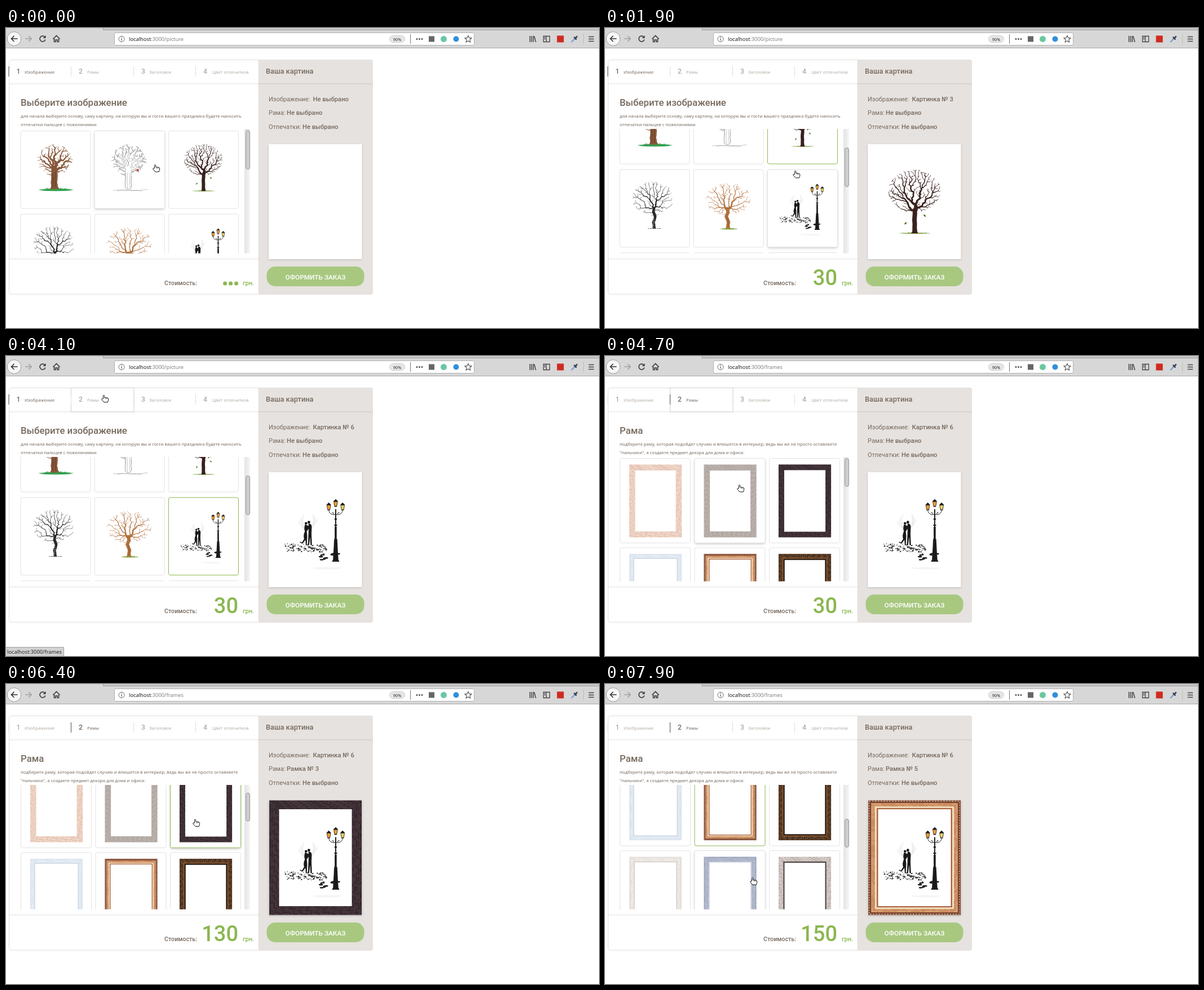
An HTML page that plays this animation: 1052x532 px, repeating every 8 s.

```html
<!DOCTYPE html>
<html lang="ru">
<head>
<meta charset="utf-8">
<title>Выберите изображение</title>
<style>
html, body { margin: 0; width: 100%; height: 100%; overflow: hidden; background: #fff; }
svg { display: block; }
text { font-family: Roboto, "Noto Sans", sans-serif; white-space: pre; }
.ui { font-family: "Noto Sans", "Open Sans", sans-serif; }
.lift { filter: drop-shadow(0 2px 2px rgba(0,0,0,.2)); }
.paper { filter: drop-shadow(0 1px 1.5px rgba(0,0,0,.2)); }
</style>
</head>
<body>
<svg id="stage" width="1052" height="532" viewBox="0 0 1052 532"></svg>
<script>
const BROWN = '#76695e', PALE = '#b3aaa2', GREEN = '#8ab74f';
const LOOP = 8000, VIEW = [179, 399.5];

const rng = seed => () => (seed = (seed * 16807) % 2147483647) / 2147483647;
const f1 = v => +v.toFixed(1);
const text = (x, y, size, str, fill = BROWN, weight = 400, more = '') =>
  `<text x="${x}" y="${y}" font-size="${size}" fill="${fill}" font-weight="${weight}" ${more}>${str}</text>`;
const ui = (x, y, size, str, fill, more = '') => text(x, y, size, str, fill, 400, `class="ui" ${more}`);
const rect = (x, y, w, h, fill, more = '') =>
  `<rect x="${x}" y="${y}" width="${w}" height="${h}" fill="${fill}" ${more}/>`;
const line = (d, stroke = '#444', w = 1.4, more = '') =>
  `<path d="${d}" fill="none" stroke="${stroke}" stroke-width="${w}" ${more}/>`;
const dot = (x, y, rx, fill, ry = rx, more = '') =>
  `<ellipse cx="${x}" cy="${y}" rx="${rx}" ry="${ry}" fill="${fill}" ${more}/>`;

// Grows twigs by joining scattered crown points to the cheapest earlier node.
function tree({ seed, n, crown: [cx, cy, rx, ry], trunk, w, color, hollow, pow = .7, thin = .35 }) {
  const rnd = rng(seed), nodes = [];
  const [bx, by] = trunk[0];
  trunk.forEach(([x, y], i) => nodes.push({ x, y: i ? y : y - w / 2, up: i - 1, len: 0, count: 0 }));
  const [tx, ty] = trunk[trunk.length - 1], first = trunk.length - 2;
  const pts = Array.from({ length: n }, () => {
    const a = rnd() * 6.283, r = Math.sqrt(rnd());
    return { x: cx + rx * r * Math.cos(a), y: cy + ry * r * Math.sin(a) };
  }).sort((a, b) => Math.hypot(a.x - tx, a.y - ty) - Math.hypot(b.x - tx, b.y - ty));
  for (const p of pts) {
    let best = 1e9;
    for (let i = first; i < nodes.length; i++) {
      const d = Math.hypot(p.x - nodes[i].x, p.y - nodes[i].y), cost = d + .4 * nodes[i].len;
      if (cost < best) { best = cost; p.up = i; p.len = nodes[i].len + d; }
    }
    nodes.push({ ...p, count: 1 });
  }
  for (let i = nodes.length - 1; i > 0; i--) nodes[nodes[i].up].count += nodes[i].count;
  const groups = {};
  nodes.slice(1).forEach(b => {
    const a = nodes[b.up], width = f1(thin + w * (b.count / n) ** pow);
    const mx = (a.x + b.x) / 2 + (rnd() - .5) * 2, my = (a.y + b.y) / 2 + (rnd() - .5) * 2;
    groups[width] = (groups[width] || '') +
      `M${f1(a.x)} ${f1(a.y)}Q${f1(mx)} ${f1(my)} ${f1(b.x)} ${f1(b.y)}`;
  });
  const layer = (c, cut) => Object.entries(groups).filter(([k]) => k > cut)
    .map(([k, d]) => line(d, c, f1(k - cut), 'stroke-linecap="round"')).join('');
  const h = w / 2, foot = w * .8, top = by - w * .9;
  const root = `<path d="M${bx - foot} ${by}Q${bx - h} ${by - 2} ${bx - h} ${top}H${bx + h}Q${bx + h} ${by - 2} ${bx + foot} ${by}z" fill="${color}"/>`;
  return hollow ? layer(color, 0) + layer('#fff', .8) : root + layer(color, 0);
}

function grass(x0, x1, y, h, color, seed) {
  const rnd = rng(seed);
  let d = `M${x0} ${y}`;
  for (let x = x0; x < x1; x += 1.6) {
    const k = Math.sin(Math.PI * (x - x0) / (x1 - x0));
    d += `L${f1(x)} ${f1(y - h * k * (.5 + rnd()))}L${f1(x + .8)} ${f1(y - h * k * .4)}`;
  }
  return `<path d="${d}L${x1} ${y}Q${(x0 + x1) / 2} ${y + h * .9} ${x0} ${y}" fill="${color}"/>`;
}

const oak = { seed: 77, n: 230, crown: [61, 52, 31, 28], trunk: [[60, 104], [59, 92], [60, 80], [60, 70]], w: 11, pow: .66 };

function couple() {
  const rnd = rng(31), ink = '#1b1a1a';
  let s = '';
  for (let i = 0; i < 7; i++)
    s += line(`M47 65Q${38 + i} ${58 - i} ${39 + i * 1.3} ${56 - i * 1.8}M57 63Q${63 - i * .4} ${58 - i} ${64 - i * 1.1} ${53 - i * 1.4}`, '#e2e2e2', .4);
  for (let i = 0; i < 130; i++) {
    const x = 22 + 55 * rnd(), y = 84 + 10 * rnd() + (x - 22) * .03;
    s += dot(f1(x), f1(y), f1(.4 + .9 * rnd()), ink, f1(.35 + rnd() * .35));
  }
  for (let i = 0; i < 12; i++)
    s += dot(f1(68 + 29 * rnd()), f1(97 + 8 * rnd()), f1(1.4 + 1.6 * rnd()), ink, f1(.8 + .6 * rnd()));
  s += dot(49.3, 57.5, 1.7, ink) + dot(53, 56, 1.8, ink)
    + `<path d="M52.500 58Q56.500 57.500 56.800 62L56.400 71 57 86H55.200L54.600 75 53.400 86H51.800L52.600 68z" fill="${ink}"/>`
    + `<path d="M48 59Q46.300 64 47.800 68 45.300 73 46.800 78L44 82.500 41.600 81.400 41.400 82.800 44.800 84 48.500 79 49 86H50.300L50.900 74 50.300 68 54.500 62 50.500 60z" fill="${ink}"/>`;
  s += line('M88 39V88', ink, 1.5) + line('M88 62V107', ink, 2.6)
    + `<path d="M86 78H90L90.600 90 91.500 105 93 107.500H83L84.500 105 85.400 90z" fill="${ink}"/>`
    + line('M88 46Q80 47 79 41M88 46Q96 47 97 41M83 43.500Q86 43 85 45.500M93 43.500Q90 43 91 45.500', ink, .7)
    + dot(88, 52, 1.8, ink, .9) + dot(88, 60, 2.2, ink, .9);
  [[79, 31, '#f29a2e'], [88, 26.5, '#f0a030'], [97, 31, '#e8cf63']].forEach(([x, y, c]) => {
    s += `<path d="M${x - 3.2} ${y + 2.6}L${x} ${y - .6} ${x + 3.2} ${y + 2.6}z" fill="${ink}"/>`
      + `<path d="M${x - 2.5} ${y + 2.8}H${x + 2.5}L${x + 1.5} ${y + 8.6}H${x - 1.5}z" fill="${c}" stroke="${ink}" stroke-width=".6"/>`
      + line(`M${x - 1.7} ${y + 9.200}H${x + 1.7}`, ink, .8);
  });
  return s + dot(76, 116, 19, '#f5f5f5', 1.5);
}

const pictures = [
  grass(31, 94, 105, 4.5, '#2f9a4c', 5) + tree({ ...oak, color: '#87573a' })
    + line('M57 101Q58 88 57 76M62 100Q60 85 62 73', '#5a341c', .9) + grass(33, 92, 106, 3, '#35a350', 9),
  tree({ ...oak, color: '#777', hollow: true })
    + line('M54 102Q56 90 55 76M58 104Q58 88 58 74M63 103Q61 88 63 74M66 101Q64 92 65 80', '#8a8a8a', .5)
    + line('M33 106Q45 104 58 106T94 104M40 107Q60 103 84 107', '#888', .5)
    + dot(73, 70, 1.8, '#d8c04a') + dot(76.5, 70, 2.2, '#b8467f'),
  grass(40, 84, 107, 1.6, '#7da03c', 3)
    + tree({ seed: 4242, n: 430, crown: [61.5, 52, 34, 28], trunk: [[62, 107], [62, 95], [62, 84], [62, 77]], w: 5.6, color: '#38221f', pow: .64 })
    + dot(50, 94, 1.8, '#587a2c', 1, 'transform="rotate(-40 50 94)"')
    + dot(75, 84, 1.9, '#587a2c', 1, 'transform="rotate(40 75 84)"'),
  tree({ seed: 915, n: 230, crown: [59, 52, 37, 30], trunk: [[61, 105], [60, 94], [63, 84], [60, 76], [61, 70]], w: 4.5, color: '#2a2a2a', thin: .3 })
    + line('M59 104Q62 92 60 84', '#ddd', 1, 'stroke-dasharray="2 1.5"') + line('M50 105H73', '#444', .8, 'stroke-dasharray="2 1 4 1"'),
  grass(46, 79, 106, 2.4, '#86a84a', 13)
    + tree({ seed: 1803, n: 260, crown: [61, 53, 40, 29], trunk: [[61, 105], [62, 94], [58, 84], [61, 76], [60, 70]], w: 5.6, color: '#b0713d' })
    + line('M61 103Q63 92 59 84', '#8a5226', .8),
  couple()
];

// Bands from the outside in: width, base, grain colour, grain dashes.
const FW = 93, FH = 129;
const mouldings = [
  [[10.5, '#eed7c8', '#e3b3a5', '5 3 9 2']],
  [[10.5, '#bbb1ac', '#a89d98', '6 4 3 5']],
  [[9.8, '#43343a', '#2c2126', '8 3 5 2']],
  [[2, '#e6ecf3', '#bfcad8', '2 1.5'], [5, '#e4ecf4', '#d6e0ea', '9 3'], [1.5, '#cdd8e4']],
  [[3, '#77432f', '#dbb59b', '1.4 1.6'], [4, '#cb8c60', '#dda97b', '9 4'], [1.6, '#f4e2c2'], [1.2, '#a9653f']],
  [[6, '#3a2418', '#b08753', '1 2'], [3, '#704629', '#916439', '5 2'], [1.6, '#1e130d']],
  [[3, '#e3ddd8', '#f5f2ef', '2 2'], [5, '#f0ece8', '#ded8d2', '7 4'], [1.5, '#d3ccc5']],
  [[3, '#9ca5bb', '#b5bccd', '6 3'], [6, '#b3bacd', '#9ea7bf', '9 4 3 2'], [1.5, '#d9dde6']],
  [[8.4, '#d6cdc8', '#a89b95', '3 6 2 4'], [2, '#4f4542']]
];
function moulding(bands) {
  let off = 0, s = '';
  const ring = (at, w, c, dash) =>
    rect(f1(at), f1(at), f1(FW - 2 * at), f1(FH - 2 * at), 'none', `stroke="${c}" stroke-width="${w}" ${dash ? `stroke-dasharray="${dash}"` : ''}`);
  for (const [w, base, grain, dash] of bands) {
    s += ring(off + w / 2, w + .2, base);
    if (grain) for (let k = 1; k < w; k += 2) s += ring(off + k, .9, grain, dash + ' ' + f1(1 + k * .3));
    off += w;
  }
  return s;
}

const lists = {
  picture: { x: 26, y: 182.5, w: 124, h: 137.5, dx: 131.2, dy: 147.5, n: 9, thumb: 69, ratio: 2.55 },
  frames: { x: 26.5, y: 181.5, w: 125, h: 150, dx: 132.5, dy: 158.5, n: 9, thumb: 50, ratio: 3.5 }
};
const place = (L, i) => [L.x + L.dx * (i % 3), L.y + L.dy * Math.floor(i / 3)];
function cards(name) {
  const L = lists[name];
  let s = '';
  for (let i = 0; i < L.n; i++) {
    const [x, y] = place(L, i);
    s += rect(x, y, L.w, L.h, '#fff', `rx="3" stroke="#e2e2e2" id="${name}${i + 1}"`);
    if (name === 'frames') s += `<use href="#m${i + 1}" transform="translate(${x + 16.5} ${y + 11})"/>`;
    else if (pictures[i]) s += `<use href="#p${i + 1}" transform="translate(${f1(x)} ${y - .5})"/>`;
  }
  return `<g id="${name}">${s}</g>`;
}

const toolbar =
  rect(0, 0, 1052, 35, '#d7d7d7') + rect(172, 0, 880, 3, '#cacaca') + line('M172.5 0V3.5H1052', '#9b9b9b', 1) + rect(0, 35, 1052, 1, '#a9a9a9')
  + dot(14.5, 19, 12.3, '#f7f7f7', 12.3, 'stroke="#9a9a9a"') + line('M20.5 19H9.5M14.5 14L9.5 19 14.5 24', '#333', 1.7)
  + line('M34 19H45M40 14L45 19 40 24', '#a3a3a3', 1.7)
  + line('M69.3 16.5A5 5 0 1 0 69.8 20.5', '#3d3d3d', 1.7) + '<path d="M70.5 13V18H65.5z" fill="#3d3d3d"/>'
  + line('M83.5 19.5L89.5 13.5 95.5 19.5M85.5 19V24.5H88V21H91V24.5H93.5V19', '#3d3d3d', 1.6)
  + rect(192.5, 8.5, 638, 22, '#fff', 'rx="2" stroke="#b2b2b2"')
  + dot(205, 19.5, 5, 'none', 5, 'stroke="#666"') + line('M205 18.5V22.5M205 16V17.3', '#555', 1.2)
  + rect(680.5, 13.5, 27, 12, '#e6e6e6', 'rx="6" stroke="#cfcfcf"') + ui(694, 22.5, 7.3, '90%', '#222', 'text-anchor="middle"')
  + rect(717, 11, 1, 17, '#777') + [729, 733.5, 738].map(x => dot(x, 19.5, 1.5, '#555')).join('')
  + rect(750, 14.5, 10, 10, '#666') + dot(776.5, 19.5, 5.5, '#6cc7a3') + dot(798.5, 19.5, 5, '#2f8fdc')
  + line('M820 13.5L821.8 17.4 826 17.9 822.9 20.8 823.7 25 820 22.9 816.3 25 817.1 20.8 814 17.9 818.2 17.4z', '#555', 1.2)
  + line('M929.5 14V25M932.5 14V25M935.5 14V25M937 14.5L940 25', '#444', 1.5)
  + line('M953.5 14.5H964.5V24.5H953.5zM958.5 14.5V24.5M955 17H957M955 19.5H957', '#444', 1.3)
  + rect(977.5, 13.5, 12, 12, '#cf2a20')
  + line('M1003 25L1009.5 18.5', '#6f9ed6', 2.2) + line('M1007.5 16L1012 20.5M1010 18L1013.5 14.5', '#3c4658', 2.6)
  + rect(1024, 10, 1, 18, '#bdbdbd') + line('M1033.5 15.5H1043M1033.5 19.5H1043M1033.5 23.5H1043', '#444', 1.5)
  + ui(218, 23, 9.3, '<tspan fill="#1c1c1c">localhost</tspan>:3000/<tspan id="path"></tspan>', '#808080');

const tabs = ['Изображение', 'Рамы', 'Заголовок', 'Цвет отпечатков'].map((name, i) => {
  const x = [5, 115.5, 226.5, 336.5][i];
  return line(`M${x} 68V86`, '#ddd', 1, `id="bar${i}"`) + `<g id="tab${i}" fill="${PALE}">`
    + `<text x="${x + 13.5}" y="81" font-size="12.2" font-weight="500">${i + 1}</text>`
    + `<text class="ui" x="${x + [28, 28.5, 27.5, 29.5][i]}" y="80.8" font-size="7.85">${name}</text></g>`;
}).join('');

const panel =
  rect(5.5, 56.5, 645, 415.5, '#fff', 'rx="4" stroke="#dedede"')
  + '<path d="M447.5 56H647Q651 56 651 60V468.5Q651 472.5 647 472.5H447.5z" fill="#e6e2df"/>'
  + rect(5, 98.5, 442.5, 1, '#e0e0e0') + rect(447.5, 98.5, 203.5, 1, '#cdc7c3') + rect(5, 409, 442.5, 1, '#e0e0e0')
  + rect(115.5, 56.5, 111.5, 42.5, '#fff', 'stroke="#cfcfcf" id="tabHover"') + tabs
  + text(26, 138, 16.8, '', BROWN, 500, 'id="title"') + ui(26, 158.8, 7.76, '', BROWN, 'id="note0"') + ui(26, 174.3, 7.76, '', BROWN, 'id="note1"')
  + text(461, 81, 12.8, 'Ваша картина', BROWN, 500)
  + [['Изображение:', 544.5], ['Рама:', 498], ['Отпечатки:', 526]].map(([s, x], i) =>
    text(466, 129.7 + 24.4 * i, 11, s) + text(x, 129.7 + 24.4 * i, 11.2, 'Не выбрано', BROWN, 500, `id="info${i}"`)).join('')
  + rect(466, 206, 165.5, 204, '#fff', 'class="paper"')
  + '<use id="art" transform="translate(465.2 218.5) scale(1.36)"/>'
  + `<use id="rim" transform="translate(467 206.5) scale(${164 / FW} ${203 / FH})"/>`
  + rect(462.5, 423, 173, 35, '#a8c880', 'rx="15"')
  + text(549, 445.6, 11.8, 'ОФОРМИТЬ ЗАКАЗ', '#fff', 500, 'text-anchor="middle"')
  + text(281, 456, 10.7, 'Стоимость:', BROWN, 500) + text(420, 456, 11, 'грн.', GREEN, 500)
  + text(412, 456, 38, '', GREEN, 500, 'text-anchor="end" id="price"')
  + `<g id="dots">${[388.5, 398.5, 408.5].map(x => dot(x, 453, 3.5, GREEN)).join('')}</g>`
  + rect(423, 179, 10, 220.5, 'url(#track)') + rect(425.5, 181.5, 7, 69, '#cdcdcd', 'rx="3.5" stroke="#999" id="thumb"')
  + `<g clip-path="url(#view)"><g id="scroller">${rect(0, 0, 1, 1, '#fff', 'rx="3" class="lift" id="lift"')}${cards('picture')}${cards('frames')}</g></g>`;

const status = `<g id="status">${rect(-.5, 516.5, 103, 16, '#d2d2d2', 'stroke="#a0a0a0"')}${ui(2, 528, 9.3, 'localhost:3000/frames', '#222')}</g>`;
const hand = '<g id="hand"><path d="M3.4 6.8V1.7Q3.4.5 4.5.5T5.6 1.7V4.5L10.8 5.2Q12.5 5.5 12.5 7V9.6L11.2 13H5L.9 8.5Q.3 6.8 1.8 6.7z" fill="#fff" stroke="#111"/>'
  + line('M7.5 5.5V7.3M9.7 5.5V7.3', '#111', .8) + '</g>';

document.getElementById('stage').innerHTML = '<defs>'
  + '<linearGradient id="track"><stop stop-color="#e3e3e3"/><stop offset="1" stop-color="#f6f6f6"/></linearGradient>'
  + `<clipPath id="view"><rect x="6" y="${VIEW[0]}" width="416.5" height="${VIEW[1] - VIEW[0]}"/></clipPath>`
  + pictures.map((p, i) => `<g id="p${i + 1}">${p}</g>`).join('')
  + mouldings.map((m, i) => `<g id="m${i + 1}">${moulding(m)}</g>`).join('')
  + '</defs>' + rect(0, 0, 1052, 532, '#fff') + toolbar + panel + status + hand;

const $ = id => document.getElementById(id);
const set = (id, attrs) => { for (const k in attrs) $(id).setAttribute(k, attrs[k]); };
const show = (id, on) => set(id, { display: on ? 'inline' : 'none' });

const copy = {
  picture: ['Выберите изображение',
    'для начала выберите основу, саму картину, на которую вы и гости вашего праздника будете наносить',
    'отпечатки пальцев с пожеланиями'],
  frames: ['Рама',
    'подберите раму, которая подойдет случаю и впишется в интерьер, ведь вы же не просто оставляете',
    '"пальчики", а создаете предмет декора для дома и офиса:']
};

// Each key: arrival time, values, and how long the move there takes.
const pointer = [
  [0, [260, 242]], [100, [257, 242]], [1100, [330, 247], 600], [2100, [335, 256], 500],
  [2400, [213, 287], 300], [2500, [218, 287]], [4100, [169, 69]], [4400, [194, 126]], [4700, [234, 228]],
  [5200, [242, 239]], [5900, [347, 226]], [6400, [331, 239.5]], [6700, [287, 238]], [7000, [232, 235]],
  [7200, [239, 230]], [7600, [240, 236]], [7900, [257, 343]]
];
const scrolling = [[0, [0]], [1900, [79], 500], [4400, [0]], [4900, [1]], [5200, [33]], [5600, [41]], [6700, [130]], [7000, [203]]];
const choices = [
  [0, {}], [600, { pic: 2, price: 30 }], [1300, { pic: 3 }], [4100, { pic: 6 }],
  [5600, { rim: 2, price: 130 }], [6100, { rim: 3 }], [7600, { rim: 5, price: 150 }]
];

function follow(keys, t) {
  let v = keys[0][1];
  for (const [at, to, span = 0] of keys) {
    if (t < at - span) break;
    const p = span ? Math.min(1, (t - at + span) / span) : 1, e = p * p * (3 - 2 * p);
    v = v.map((a, i) => a + (to[i] - a) * e);
  }
  return v;
}

function render(t) {
  const page = t < 4400 ? 'picture' : 'frames', L = lists[page];
  const [px, py] = follow(pointer, t), scroll = Math.round(follow(scrolling, t)[0]);
  const { pic, rim, price } = Object.assign({}, ...choices.filter(c => c[0] <= t).map(c => c[1]));
  const chosen = page === 'picture' ? pic : rim;

  $('path').textContent = page;
  copy[page].forEach((s, i) => $(['title', 'note0', 'note1'][i]).textContent = s);
  ['picture', 'frames'].forEach((name, i) => {
    show(name, name === page);
    set('tab' + i, { fill: name === page ? BROWN : PALE });
    set('bar' + i, { stroke: name === page ? '#777' : '#ddd', 'stroke-width': name === page ? 1.4 : 1 });
  });
  show('tabHover', t >= 4100 && t < 5600);
  show('status', t >= 4100 && t < 4400);

  let hovered = false;
  for (let i = 0; i < L.n; i++) {
    const [x, y] = place(L, i), hx = px + 4 - x, hy = py + 1 + scroll - y;
    set(page + (i + 1), { stroke: chosen === i + 1 ? GREEN : '#e2e2e2' });
    if (hx > 0 && hx < L.w && hy > 0 && hy < L.h && py > VIEW[0] && py < VIEW[1]) {
      hovered = true;
      set('lift', { x, y, width: L.w, height: L.h });
    }
  }
  show('lift', hovered);
  set('scroller', { transform: `translate(0 ${-scroll})` });
  set('thumb', { y: 181.5 + scroll / L.ratio, height: L.thumb });

  $('info0').textContent = pic ? 'Картинка № ' + pic : 'Не выбрано';
  $('info1').textContent = rim ? 'Рамка № ' + rim : 'Не выбрано';
  $('price').textContent = price || '';
  show('dots', !price);
  show('art', pic);
  show('rim', rim);
  if (pic) set('art', { href: '#p' + pic });
  if (rim) set('rim', { href: '#m' + rim });
  set('hand', { transform: `translate(${f1(px)} ${f1(py)})` });
}

const start = performance.now();
function tick(now) {
  const t = Math.max(0, now - start) % LOOP;
  render(Math.floor(t / 100) * 100);
  requestAnimationFrame(tick);
}
render(0);
requestAnimationFrame(tick);
</script>
</body>
</html>
```
